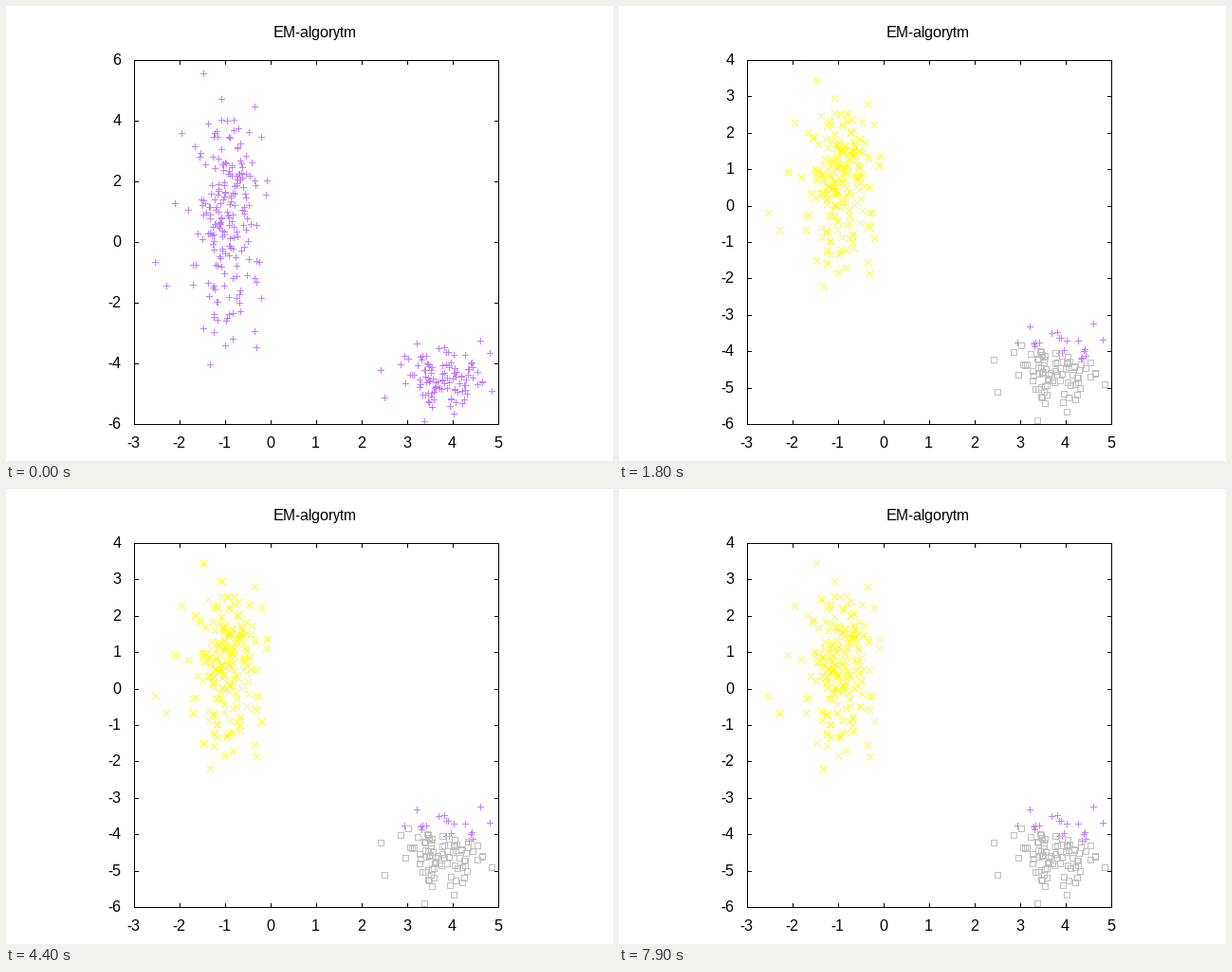
A matplotlib script that plays this animation: 640x480 px, repeating every 8000 ms.

```python
import numpy as np
import matplotlib.pyplot as plt
from matplotlib.animation import FuncAnimation
from matplotlib.collections import LineCollection

W, H, DPI = 640, 480, 100
PX = 72 / DPI                      # one pixel in points
LEFT, RIGHT, TOP, BOTTOM = 135, 519, 57, 441
FRAMES, STEP = 80, 100
RESCALED = 18                      # frame where the tall cluster is squeezed

PURPLE, YELLOW, GREEN, GRAY = "#c080ff", "#ffff00", "#00ff00", "#c0c0c0"

plt.rcParams["text.hinting"] = "default"
plt.rcParams["text.hinting_factor"] = 1


def cloud(rng, n, center, sigma, radii):
    """Normal points kept inside an ellipse."""
    pts = rng.normal(center, sigma, (n * 4, 2))
    inside = (((pts - center) / radii) ** 2).sum(axis=1) < 1
    return pts[inside][:n]


rng = np.random.default_rng(12)

# Tall cluster: outermost points plus a random body
tall = np.vstack([
    [(-1.48, 5.57), (-1.08, 4.72), (-.36, 4.47), (-1.95, 3.60), (-.20, 3.48),
     (-.08, 2.03), (-2.10, 1.27), (-2.55, -.65), (-2.30, -1.43), (-.20, -1.85)],
    cloud(rng, 190, (-1.0, .8), (.42, 1.75), (.95, 3.5)),
])
# Its lowest points, in the order they leave the small cluster's class
stragglers = np.array([(-1.48, -2.85), (-1.24, -2.97), (-.83, -3.20),
                       (-1.00, -3.42), (-.36, -2.95), (-1.33, -4.03),
                       (-.31, -3.47)])
squeezed = np.vstack([tall, stragglers]) * (1, .587) + (0, .18)

# Small cluster, later cut by a slanted line through the wavering point
wavering = np.array([(4.34, -4.20)])
small = np.vstack([
    [(2.42, -4.23), (2.50, -5.12), (3.38, -5.90), (4.02, -5.65), (4.85, -4.90),
     (4.82, -3.67), (4.60, -3.25), (3.20, -3.33)],
    cloud(rng, 100, (3.7, -4.45), (.5, .5), (1.1, 1.0)),
])
above = small[:, 1] > wavering[0, 1] - .3 * (small[:, 0] - wavering[0, 0])

# Marker strokes as offsets in pixels; diagonals are stepped pixel by pixel
R = 3.5
PLUS = [((-R, 0), (R, 0)), ((0, -R), (0, R))]
CROSS = [((i - .5, s * i), (i + .5, s * i))
         for s in (-1, 1) for i in range(-3, 4)]
STAR = PLUS + CROSS
BOX = [((-R, -3), (R, -3)), ((-R, 3), (R, 3)),
       ((-3, -R), (-3, R)), ((3, -R), (3, R))]


def strokes(pts, glyph, ymax):
    """Glyph segments around each data point, centred on whole pixels."""
    x = LEFT + (pts[:, 0] + 3) * (RIGHT - LEFT) / 8
    y = TOP + (ymax - pts[:, 1]) * (BOTTOM - TOP) / (ymax + 6)
    centers = np.round(np.column_stack([x, y])) + .5
    return (centers[:, None, None] + np.array(glyph)).reshape(-1, 2, 2)


fig = plt.figure(figsize=(W / DPI, H / DPI), dpi=DPI, facecolor="white")
ax = fig.add_axes([0, 0, 1, 1])
ax.set_xlim(0, W)
ax.set_ylim(H, 0)
ax.axis("off")


def lines(color):
    lc = LineCollection([], colors=color, linewidths=PX, snap=False)
    return ax.add_collection(lc, autolim=False)


def write(x, y, s, ha="center"):
    return ax.text(x, y, s, ha=ha, va="baseline", color="black",
                   family="Liberation Sans", size=16 * PX)


layers = purple, gray, green, yellow = [
    lines(c) for c in (PURPLE, GRAY, GREEN, YELLOW)]
frame = lines("black")

write(325.5, 33, "EM-algorytm")
for v in range(-3, 6):
    write(LEFT + 48 * (v + 3) - .5, 466, str(v))
y_labels = [write(121.5, 0, "", "right") for _ in range(11)]


def draw_axes(ymax, step, tick=5):
    l, r, t, b = LEFT, RIGHT + 1, TOP, BOTTOM + 1
    segs = [((l, y + .5), (r, y + .5)) for y in (TOP, BOTTOM)]
    segs += [((x + .5, t), (x + .5, b)) for x in (LEFT, RIGHT)]
    for x in range(LEFT, RIGHT + 1, 48):
        x += .5
        segs += [((x, t), (x, t + tick)), ((x, b), (x, b - tick))]
    for text in y_labels:
        text.set_text("")
    for v, text in zip(range(-6, ymax + 1, step), y_labels):
        y = round(TOP + (ymax - v) * (BOTTOM - TOP) / (ymax + 6)) + .5
        segs += [((l, y), (l + tick, y)), ((r, y), (r - tick, y))]
        text.set_text(str(v))
        text.set_y(y + 4.5)
    frame.set_segments(segs)


def draw_first(k):
    draw_axes(6, 2)
    if k == 0:
        everything = np.vstack([tall, stragglers, small, wavering])
        purple.set_segments(strokes(everything, PLUS, 6))
        return
    # The green class shrinks fast, then loses a straggler every third frame
    taken = tall[:, 1] < -2.7 + .7 * max(3 - k, 0)
    stage = (k - 2) // 3
    freed = stage + 1 if stage > 0 else 0
    greens = np.vstack([small, wavering, tall[taken], stragglers[freed:]])
    yellows = np.vstack([tall[~taken], stragglers[:freed]])
    green.set_segments(strokes(greens, STAR, 6))
    yellow.set_segments(strokes(yellows, CROSS, 6))


def draw_later(k):
    draw_axes(4, 1)
    # The wavering point flips each frame, with two pauses
    pauses = (k >= 32) + (k >= 67)
    up, down = small[above], small[~above]
    if (k + pauses) % 2 == 0:
        up = np.vstack([up, wavering])
    else:
        down = np.vstack([down, wavering])
    purple.set_segments(strokes(up, PLUS, 4))
    gray.set_segments(strokes(down, BOX, 4))
    yellow.set_segments(strokes(squeezed, CROSS, 4))


def update(k):
    for layer in layers:
        layer.set_segments([])
    if k < RESCALED:
        draw_first(k)
    else:
        draw_later(k)
    return []


anim = FuncAnimation(fig, update, frames=FRAMES, interval=STEP,
                     repeat=True, repeat_delay=0, blit=False)
plt.show()
```
